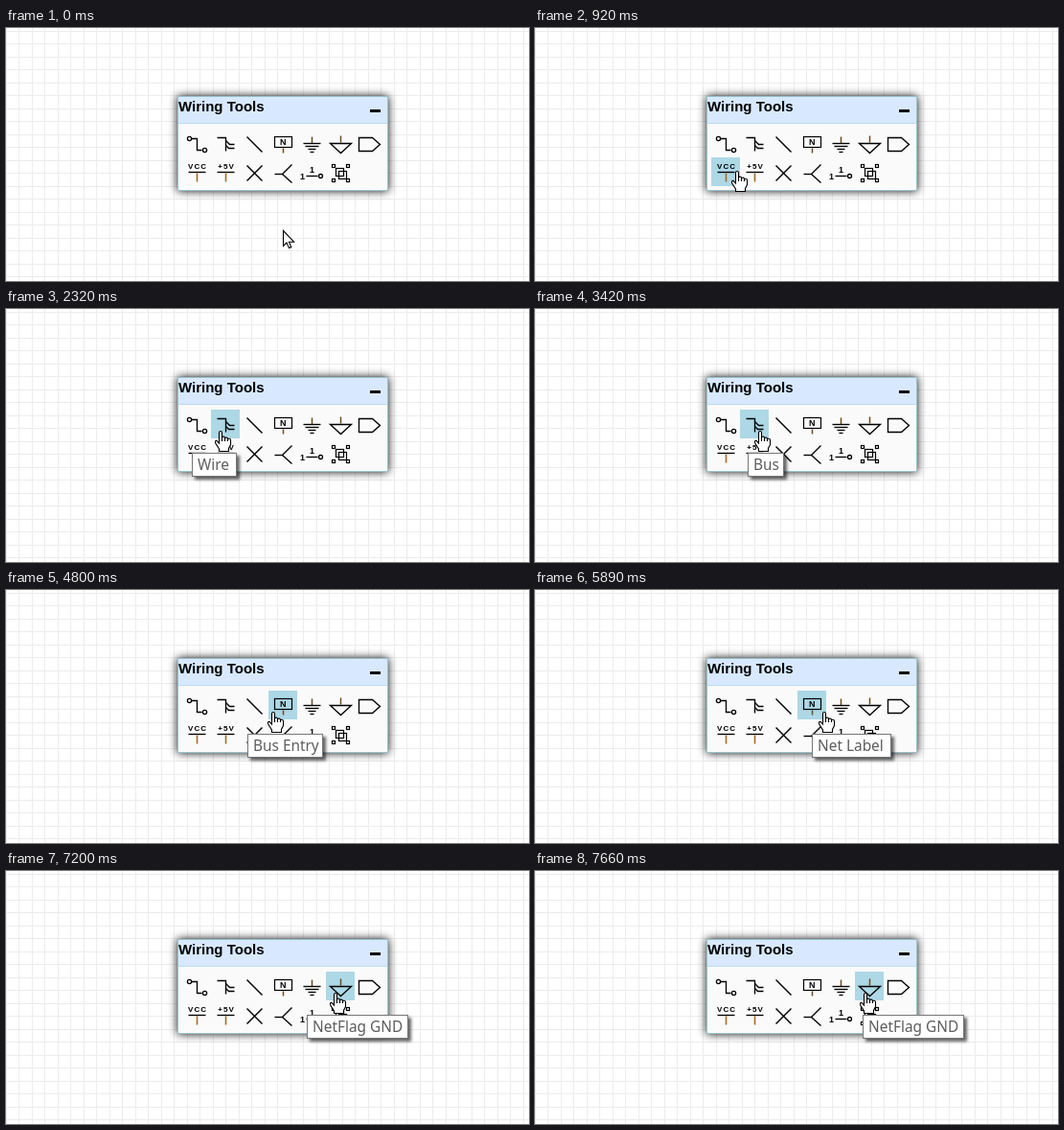
Recreate the animation shown at these times as an HTML page with a canvas. Size 546 by 264 pixels, loop 8000 ms.

```html
<!DOCTYPE html>
<html lang="en">
<head>
<meta charset="utf-8">
<title>Wiring Tools</title>
<style>
html, body { margin: 0; width: 100%; height: 100%; overflow: hidden; background: #fff; }
canvas { display: block; }
</style>
</head>
<body>
<canvas id="stage" width="546" height="264"></canvas>
<script>
const ctx = document.getElementById('stage').getContext('2d');
const W = 546, H = 264, LOOP = 8000;
const INK = '#000', BROWN = '#a56c22', STEM = '#6e4c20';
const CELL = 30, LEFT = 184, TOP = 105;

// Pointer moves: first step, last step, number of steps, target, easing power
const moves = [
  { from: 680, to: 1150, n: 7, x: 184, y: 128, pow: 1.6 },
  { from: 1230, to: 1310, n: 2, x: 195, y: 127, pow: 1 },
  { from: 2080, to: 2400, n: 5, x: 225, y: 127, pow: 2 },
  { from: 3420, to: 3640, n: 4, x: 255, y: 127, pow: 1.4 },
  { from: 4570, to: 4570, n: 1, x: 253, y: 127, pow: 1 },
  { from: 4720, to: 5030, n: 5, x: 292, y: 127, pow: 2.1 },
  { from: 5890, to: 6190, n: 5, x: 317, y: 127, pow: 2.3 },
  { from: 6970, to: 7270, n: 5, x: 345, y: 127, pow: 2 }
];

const tips = [
  { from: 1630, to: 2790, x: 194, w: 47, text: 'Wire' },
  { from: 2790, to: 4020, x: 222, w: 38, text: 'Bus' },
  { from: 4020, to: 5350, x: 252, w: 79, text: 'Bus Entry' },
  { from: 5350, to: 6510, x: 289, w: 83, text: 'Net Label' },
  { from: 6510, to: 7430, x: 314, w: 106, text: 'NetFlag GND' },
  { from: 7660, to: 8000, x: 342, w: 106, text: 'NetFlag GND' }
];

function line(points, color = INK, width = 1.35, close = false) {
  ctx.beginPath();
  for (let i = 0; i < points.length; i += 2) ctx.lineTo(points[i] + .5, points[i + 1] + .5);
  if (close) ctx.closePath();
  ctx.strokeStyle = color;
  ctx.lineWidth = width;
  ctx.stroke();
}

function box(x, y, w, h) {
  ctx.strokeStyle = INK;
  ctx.lineWidth = 1.2;
  ctx.strokeRect(x + .5, y + .5, w, h);
}

function ring(x, y, r, color = INK, width = 1.3) {
  ctx.beginPath();
  ctx.arc(x + .5, y + .5, r, 0, Math.PI * 2);
  ctx.strokeStyle = color;
  ctx.lineWidth = width;
  ctx.stroke();
}

function label(text, x, y, font, color = INK, align = 'center', spacing = 0) {
  ctx.font = font;
  ctx.letterSpacing = spacing + 'px';
  ctx.textAlign = align;
  ctx.fillStyle = color;
  ctx.fillText(text, x, y);
}

const bold = size => `bold ${size}px "Liberation Sans", sans-serif`;

function drawGrid() {
  ctx.fillStyle = '#fff';
  ctx.fillRect(0, 0, W, H);
  ctx.fillStyle = '#ececec';
  const step = 13.5;
  for (let x = 0; x < W; x += step) ctx.fillRect(Math.floor(x), 0, 1, H);
  for (let y = 3; y < H; y += step) ctx.fillRect(0, Math.floor(y), W, 1);
}

function drawPanel() {
  ctx.save();
  ctx.shadowColor = 'rgba(0,0,0,.95)';
  ctx.shadowBlur = 9;
  ctx.fillStyle = '#fafafa';
  ctx.fillRect(179, 71, 220, 99);
  ctx.restore();
  ctx.fillStyle = '#d8e9ff';
  ctx.fillRect(179, 71, 220, 28);
  ctx.fillStyle = '#b9dcee';
  ctx.fillRect(179, 99, 220, 1);
  ctx.strokeStyle = '#98c2cb';
  ctx.lineWidth = 1;
  ctx.strokeRect(179.5, 71.5, 219, 98);
  label('Wiring Tools', 180, 87, bold(15), '#000', 'left');
  ctx.fillStyle = '#000';
  ctx.fillRect(380, 85, 11, 3);
}

function drawPower(text, x) {
  label(text, x + 1, 147, bold(8), INK, 'center', 1);
  line([x - 9, 150, x + 9, 150]);
  line([x, 151, x, 160], BROWN, 1.6);
}

function drawIcons() {
  // Wire
  ring(191, 115, 2.1);
  line([193, 115, 199, 115, 199, 127, 204, 127]);
  ring(207, 127, 2.1);
  // Bus
  line([220, 114, 229, 114, 229, 128]);
  line([229, 117, 233, 121, 238, 121]);
  line([229, 122, 232, 125, 238, 125]);
  // Line
  line([251, 113, 267, 129]);
  // Net label
  box(280, 113, 18, 11);
  label('N', 289.3, 122.3, bold(9));
  line([289, 125, 289, 130], STEM, 1.5);
  // Ground flags
  line([319, 113, 319, 120], STEM, 1.5);
  [9, 7, 4, 2].forEach((half, i) => line([319 - half, 120 + i * 3, 319 + half, 120 + i * 3]));
  line([349, 112, 349, 119], STEM, 1.5);
  line([338, 120, 360, 120, 349, 130], INK, 1.35, true);
  // Port
  line([368, 114, 382, 114, 390, 121, 382, 128, 368, 128], INK, 1.35, true);

  drawPower('VCC', 199);
  drawPower('+5V', 229);
  // No connect
  line([251, 143, 267, 159]);
  line([267, 143, 251, 159]);
  // Bus split
  line([280, 152, 288, 152]);
  line([298, 142, 288, 152, 298, 161]);
  // Pin
  label('1', 309.5, 158, bold(9));
  label('1', 319.5, 151, bold(9));
  line([313, 154, 325, 154]);
  ring(328, 154, 2);
  // Group
  box(344, 146, 8, 8);
  box(347, 149, 8, 8);
  for (const x of [340, 355]) for (const y of [142, 157]) box(x, y, 3, 3);
}

function pointerAt(t) {
  let x = 289, y = 211;
  for (const m of moves) {
    if (t < m.from) break;
    const gap = m.n > 1 ? (m.to - m.from) / (m.n - 1) : 1;
    const k = Math.min(m.n, Math.floor((t - m.from) / gap + 1e-6) + 1);
    const p = 1 - Math.pow(1 - k / m.n, m.pow);
    x += (m.x - x) * p;
    y += (m.y - y) * p;
  }
  return { x: Math.round(x), y: Math.round(y) };
}

function cellAt({ x, y }) {
  const col = Math.floor((x - LEFT) / CELL), row = Math.floor((y - TOP) / CELL);
  const inside = col >= 0 && row >= 0 && (row === 0 && col < 7 || row === 1 && col < 6);
  return inside ? { x: LEFT + col * CELL, y: TOP + row * CELL } : null;
}

function tipAlpha(t) {
  if (t < 1690) return .45;
  if (t < 1770) return .78;
  return t >= 7350 && t < 7430 ? .5 : 1;
}

function drawTip(t) {
  const tip = tips.find(d => t >= d.from && t < d.to);
  if (!tip) return;
  const y = 150, h = 25, alpha = tipAlpha(t);
  ctx.save();
  ctx.globalAlpha = alpha;
  // Shadow only outside the box, so that it stays clear while fading
  ctx.save();
  ctx.beginPath();
  ctx.rect(0, 0, W, H);
  ctx.rect(tip.x, y, tip.w, h);
  ctx.clip('evenodd');
  ctx.shadowColor = 'rgba(0,0,0,.6)';
  ctx.shadowBlur = 3;
  ctx.shadowOffsetX = ctx.shadowOffsetY = 3;
  ctx.fillRect(tip.x, y, tip.w, h);
  ctx.restore();
  ctx.globalAlpha = Math.sqrt(alpha);
  ctx.fillStyle = '#fff';
  ctx.fillRect(tip.x, y, tip.w, h);
  ctx.globalAlpha = alpha;
  ctx.strokeStyle = '#767676';
  ctx.lineWidth = 1;
  ctx.strokeRect(tip.x + .5, y + .5, tip.w - 1, h - 1);
  label(tip.text, tip.x + 6, 168, '15.4px "Noto Sans", sans-serif', '#5c5c5c', 'left');
  ctx.restore();
}

const arrow = new Path2D('M.5 .5V16.5L4 13L6.5 18.6L8.8 17.6L6.4 12.2H11.6Z');
const hand = new Path2D('M-1.5 2Q-1.5 .5 0 .5Q1.5 .5 1.5 2V6.5Q4.5 5.5 4.5 7.5Q7.5 6.5 7.5 8.5' +
  'Q10.5 7.5 10.5 10V14.5L8.5 18.5V21.5H-1.5V19L-5.3 13Q-6 10 -4 10.3L-1.5 13Z');
const knuckles = new Path2D('M1.5 6.5V11M4.5 7.5V11M7.5 8.5V11');

function drawPointer({ x, y }, overIcon) {
  ctx.save();
  ctx.translate(x, y);
  ctx.fillStyle = '#fff';
  ctx.strokeStyle = '#000';
  ctx.lineWidth = 1.1;
  const shape = overIcon ? hand : arrow;
  ctx.fill(shape);
  ctx.stroke(shape);
  if (overIcon) ctx.stroke(knuckles);
  ctx.restore();
}

function draw(t) {
  const pos = pointerAt(t), cell = cellAt(pos);
  drawGrid();
  drawPanel();
  if (cell) {
    ctx.fillStyle = '#add8e6';
    ctx.fillRect(cell.x, cell.y, CELL, CELL);
  }
  drawIcons();
  drawTip(t);
  // Click mark around the pointer tip
  if (t >= 380 && t < 680) ring(pos.x, pos.y, 11.3, '#8a8a8a', 2);
  drawPointer(pos, cell);
}

const start = performance.now();
function frame() {
  draw((performance.now() - start) % LOOP);
  requestAnimationFrame(frame);
}
frame();
</script>
</body>
</html>
```
